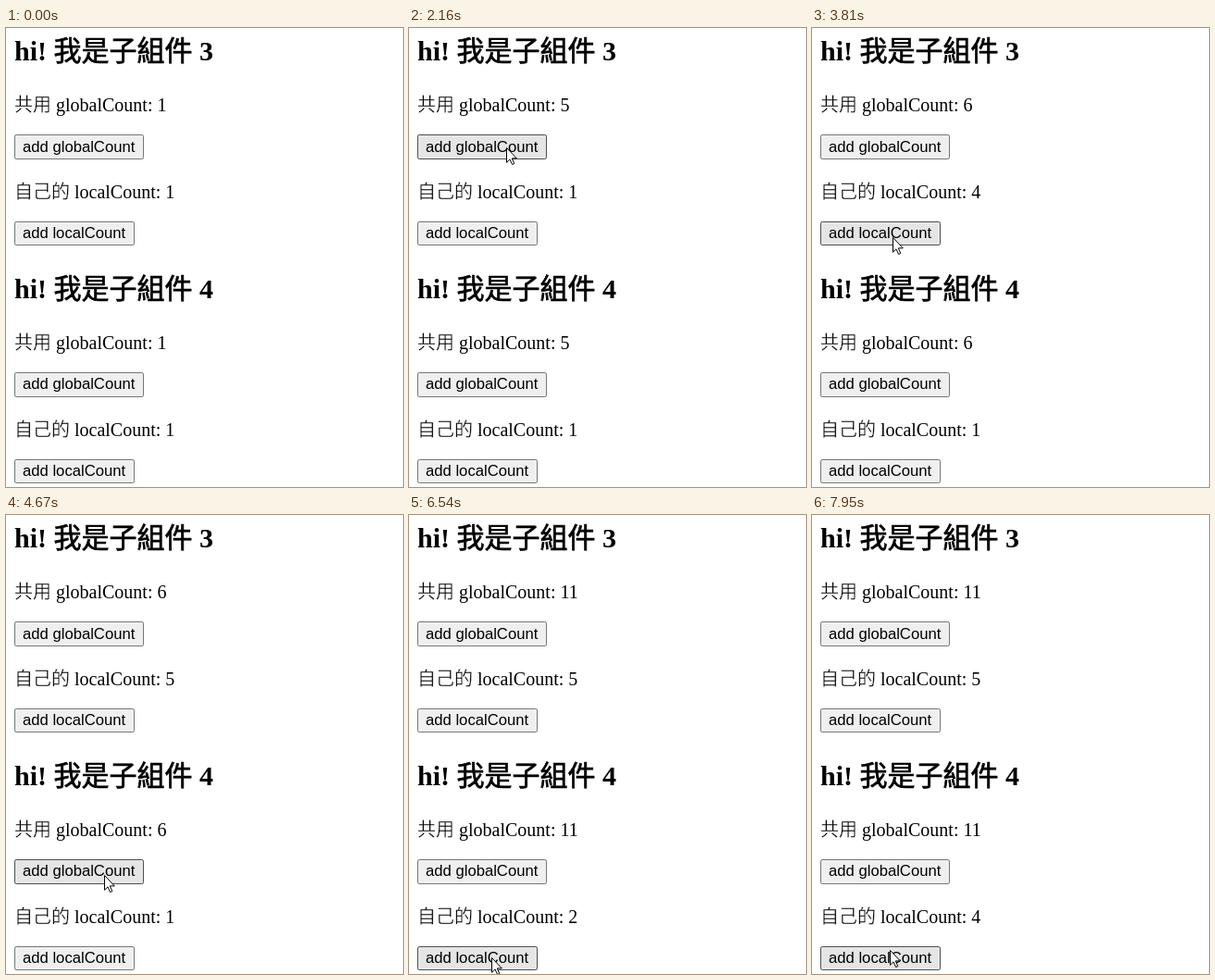
An HTML page that plays this animation: 429 by 496 pixels, repeating every 8 s.

```html
<!DOCTYPE html>
<html lang="zh-Hant">
<head>
<meta charset="utf-8">
<style>
  html, body { margin: 0; height: 100%; overflow: hidden; background: #fff; }
  svg { display: block; }
  text { font: 20px "Liberation Serif", "Noto Sans CJK TC", "Noto Sans CJK", serif; }
  .title { font-size: 30px; font-weight: 700; }
  .label { font: 16.67px "Liberation Sans", sans-serif; }
  /* Thin strokes tune the weight of the Chinese glyphs */
  tspan { stroke: #fff; stroke-width: .35px; }
  .title tspan { font-weight: 400; stroke: #000; stroke-width: .7px; }
  .button { fill: #efefef; stroke: #767676; }
  .hover { fill: #e5e5e5; stroke: #4f4f4f; }
  .active { fill: #f5f5f5; stroke: #8d8d8d; }
</style>
</head>
<body>
<svg id="stage" width="429" height="496" viewBox="0 0 429 496">
  <g id="page"></g>
  <circle id="spot" r="15" fill="#fff200" fill-opacity=".6"/>
  <path id="cursor" d="M.5.5V16.3L4 12.9 6.6 18.5 8.8 17.6 6.3 11.9H11.3Z" fill="#fff" stroke="#000"/>
</svg>
<script>
const LOOP = 8000, STEP = 70, HOLD = 130, SECTION = 256.5;

// Start, end, target x and y, ease-out power for x and y
const moves = [
  [260, 820, 105, 129, 1.3, 4],
  [2490, 2830, 85, 237],
  [2900, 2970, 85, 240],
  [3080, 3280, 87, 226],
  [4470, 4670, 106, 389],
  [5940, 6340, 89, 478],
  [7140, 7480, 87, 462],
  [7610, 7680, 86, 447],
  [7680, 7950, 84, 470]
];

// Runs of clicks: first press, gap, count
const presses = [
  [1090, 335, 3], [2030, 200, 2], [3350, 165, 3], [4210, 0, 1],
  [4940, 175, 4], [5730, 0, 1], [6410, 0, 1], [6740, 140, 2]
].flatMap(([first, gap, n]) => Array.from({ length: n }, (_, i) => first + i * gap));

const get = id => document.getElementById(id);
const page = get("page"), spot = get("spot"), cursor = get("cursor");

function add(parent, tag, attrs, content = "") {
  const el = document.createElementNS("http://www.w3.org/2000/svg", tag);
  for (const name in attrs) el.setAttribute(name, attrs[name]);
  el.textContent = content;
  parent.append(el);
  return el;
}

function addText(y, className, before, chinese) {
  const text = add(page, "text", { x: 9, y, class: className }, before);
  add(text, "tspan", {}, chinese);
  const tail = document.createTextNode("");
  text.append(tail);
  return tail;
}

const buttons = [];
function addCounter(name, title, key, top, w, h, baseline) {
  const line = addText(top - 25, "", "", title);
  const rect = add(page, "rect", { x: 9.5, y: top + .5, width: w - 1, height: h - 1, rx: 1.7 });
  add(page, "text", { class: "label", x: 18, y: baseline }, "add " + name);
  buttons.push({ name, key, top, w, h, line, rect });
}

[3, 4].forEach((id, i) => {
  const snap = y => Math.floor(y + i * SECTION);
  addText(snap(35.6), "title", "hi! ", "我是子組件").data = " " + id;
  addCounter("globalCount", "共用", "global", snap(115.6), 140, 27, snap(134.2));
  addCounter("localCount", "自己的", "local" + id, snap(209.6), 130, 26, snap(227.6));
});

function cursorAt(t) {
  let x = 397, y = 411;
  for (const [start, end, toX, toY, powX = 1, powY = 1] of moves) {
    if (t < start) break;
    const p = t >= end ? 1 : Math.floor((t - start) / STEP) * STEP / (end - start);
    x += (toX - x) * (1 - (1 - p) ** powX);
    y += (toY - y) * (1 - (1 - p) ** powY);
  }
  return [Math.round(x), Math.round(y)];
}

const buttonAt = ([x, y]) => buttons.find(b =>
  x >= 9 && x < 9 + b.w && y >= b.top && y < b.top + b.h);

function draw(t) {
  const pos = cursorAt(t);
  const hovered = buttonAt(pos);
  const pressed = presses.some(down => t >= down && t < down + HOLD);

  const counts = { global: 1, local3: 1, local4: 1 };
  for (const down of presses)
    if (down + HOLD <= t) counts[buttonAt(cursorAt(down)).key]++;

  for (const b of buttons) {
    b.line.data = ` ${b.name}: ${counts[b.key]}`;
    const state = b !== hovered ? "" : pressed ? " active" : " hover";
    b.rect.setAttribute("class", "button" + state);
  }

  cursor.style.display = t < moves[0][0] ? "none" : "";
  spot.style.display = pressed ? "" : "none";
  for (const el of [cursor, spot]) el.setAttribute("transform", `translate(${pos})`);
}

const start = performance.now();
function tick() {
  draw((performance.now() - start) % LOOP);
  requestAnimationFrame(tick);
}
tick();
</script>
</body>
</html>
```
